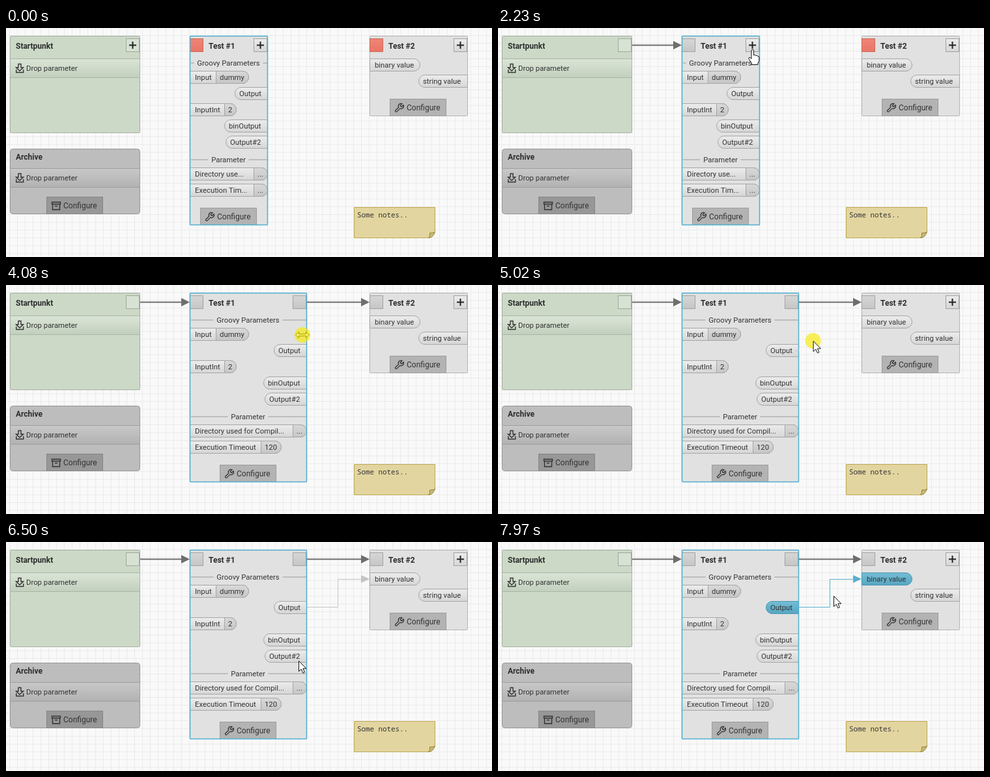
An HTML page that plays this animation: 746 by 353 pixels, repeating every 8000 ms.

```html
<!DOCTYPE html>
<html lang="en">
<head>
<meta charset="utf-8">
<title>Workflow editor</title>
<style>
  html, body { margin: 0; width: 100%; height: 100%; overflow: hidden; background: #f9f9f9; }
  svg { display: block; width: 746px; height: 353px; }
  text { font: 11.33px Roboto, sans-serif; fill: #333; white-space: pre; }
  .title { font-weight: 700; font-size: 12px; fill: #2d2d2d; }
  .big { font-size: 12px; }
  .mono { font: 10.83px "Noto Sans Mono", monospace; }
</style>
</head>
<body>
<svg id="stage" viewBox="0 0 746 353">
  <defs>
    <pattern id="grid" x="5" y="-1" width="12" height="12" patternUnits="userSpaceOnUse">
      <path d="M.5 0V12M0 .5H12" stroke="#ebebeb" fill="none"/>
    </pattern>
  </defs>
  <rect width="746" height="353" fill="url(#grid)"/>
  <g id="scene"></g>
</svg>
<script>
const LOOP = 8000, TICK = 77.5, LEAD = 20;
const LAG = 93;   // a dragged line trails the pointer
const INK = '#333', LINK = '#6e6e6e', PALE = '#c4c4c4', BLUE = '#5cb0cd';
const EDGE = '#a6a6a6';

// Moments at which a drag is released
const FLOW_1 = 1760, FLOW_2 = 3010, WIDENED = 4400, WIRED = 5740, DROPPED = 7590;

// What the pointer does: start, duration, goal, drag?, shape on arrival
const move = (at, dur, x, y, drag = false, shape = 'arrow') => ({ at, dur, x, y, drag, shape });
const ENTRY = { x: 390, y: 181 };
const MOVES = [
  move(220, 150, 328, 79),
  move(450, 390, 196, 28, false, 'hand'),
  move(910, 620, 291, 27, true, 'hand'),
  move(FLOW_1, 480, 391, 33, false, 'hand'),
  move(2310, 400, 572, 26, true, 'hand'),
  move(FLOW_2, 540, 397, 76, false, 'resize'),
  move(3780, 230, 455, 77, true, 'resize'),
  move(WIDENED, 150, 464, 115),
  move(4720, 200, 455, 102),
  move(4940, 440, 584, 51, true),
  move(WIRED, 70, 521, 114, false, 'resize'),
  move(5890, 600, 449, 183),
  move(6580, 470, 584, 52, true),
  move(DROPPED, 380, 515, 83)
];

function pointer(t) {
  const i = MOVES.findLastIndex(m => m.at <= t);
  if (i < 0) return { ...ENTRY, hidden: true };
  const m = MOVES[i], from = MOVES[i - 1] || ENTRY;
  const k = Math.min(1, (t - m.at) / m.dur);
  return {
    x: from.x + (m.x - from.x) * k,
    y: from.y + (m.y - from.y) * (1 - (1 - k) ** 1.5),
    drag: m.drag,
    shape: m.drag || k === 1 ? m.shape : 'arrow'
  };
}

// Drawing helpers
const defs = document.querySelector('defs');
function gradient(id, top, bottom) {
  defs.insertAdjacentHTML('beforeend', `<linearGradient id="${id}" x2="0" y2="1">` +
    `<stop stop-color="${top}"/><stop offset="1" stop-color="${bottom}"/></linearGradient>`);
  return `url(#${id})`;
}
const CHIP = gradient('chip', '#ececec', '#d6d6d6');
const VALUE = gradient('value', '#d9d9d9', '#c6c6c6');
const ACTIVE = gradient('active', '#74bdd5', '#56a6c2');
const GREEN_ROW = gradient('greenRow', '#dbe5d7', '#c2cfbd');
const GREY_ROW = gradient('greyRow', '#c8c8c8', '#b2b2b2');
const SQUARE = gradient('square', '#d6d6d6', '#c6c6c6');
const RED = gradient('red', '#ee8577', '#ea7666');

const text = (x, y, s, cls = '') => `<text x="${x}" y="${y}" class="${cls}">${s}</text>`;
const path = (d, stroke, fill = 'none', width = 1) =>
  `<path d="${d}" stroke="${stroke}" fill="${fill}" stroke-width="${width}"/>`;
const box = (x, y, w, h, fill, stroke, r = 0, width = 1) =>
  `<rect x="${x + .5}" y="${y + .5}" width="${w - 1}" height="${h - 1}" rx="${r}" ` +
  `fill="${fill}" stroke="${stroke}" stroke-width="${width}"/>`;

const port = (x, plus, fill = CHIP, stroke = '#a2a2a2') =>
  box(x, 16, 21, 21, fill, stroke) +
  (plus ? path(`M${x + 5} 26.5h11M${x + 10.5} 21v11`, '#222', 'none', 2) : '');
const inPort = (x, linked) =>
  linked ? port(x, false, SQUARE) : port(x, false, RED, '#c96a5d');

const pill = (x, y, end, fill, edge = EDGE) =>
  path(`M${x + .5} ${y + .5}H${end - 10}a9.5 9.5 0 0 1 0 19H${x + .5}z`, edge, fill);

const inChip = (x, y, label, end, blue) =>
  pill(x, y, end, blue ? ACTIVE : CHIP, blue ? '#4a96b1' : EDGE) + text(x + 8, y + 14, label);

const valueChip = (x, y, label, end, split, value) =>
  inChip(x, y, label, end) + pill(split, y, end, VALUE) + text(split + 6, y + 14, value);

function outChip(y, label, end, width, blue) {
  const x = end - width;
  return path(`M${end - .5} ${y + .5}H${x + 10}a9.5 9.5 0 0 0 0 19H${end - .5}z`,
    blue ? '#4a96b1' : EDGE, blue ? ACTIVE : CHIP) + text(x + 7, y + 14, label);
}

const WRENCH = 'M14.7 6.3a1 1 0 0 0 0 1.4l1.6 1.6a1 1 0 0 0 1.4 0l3.77-3.77a6 6 0 0 1-7.94 7.94' +
  'l-6.91 6.91a2.12 2.12 0 0 1-3-3l6.91-6.91a6 6 0 0 1 7.94-7.94l-3.76 3.76z';

const configure = (x, y) =>
  box(x, y, 87, 27, '#b3b3b3', '#9c9c9c') +
  `<g transform="translate(${x + 6.5} ${y + 6}) scale(.68)">${path(WRENCH, INK, 'none', 1.9)}</g>` +
  text(x + 26, y + 18, 'Configure', 'big');

const dropRow = (y, fill, edge) =>
  box(6, y, 200, 30, fill, edge) + text(31, y + 19, 'Drop parameter') +
  path(`M19 ${y + 8.5}h4v5.500h3.500l-5.500 5-5.500-5h3.500zM15.700 ${y + 17}v4.500h11v-4.500`, INK, 'none', 1.4);

function section(y, label, half, w) {
  const mid = 281.5 + w / 2;
  return `<text x="${mid}" y="${y + 4}" text-anchor="middle">${label}</text>` +
    path(`M284 ${y}H${mid - half}M${mid + half} ${y}H${281 + w}`, '#999');
}

const arrowHead = (x, y, color, h) =>
  `<path d="M${x} ${y}l-13 ${-h}v${2 * h}z" fill="${color}"/>`;

function flow(from, to) {
  const y = 26.5;
  return to < from + 13 ? '' :
    path(`M${from} ${y}H${to - 11}`, LINK, 'none', 2) + arrowHead(to, y, LINK, 6.5);
}

function wire(y, end, color) {
  const mid = Math.floor((462 + end.x) / 2) - .5;
  return path(`M462 ${y + .5}H${mid}V${end.y + .5}H${end.x - (end.head ? 10 : 0)}`, color) +
    (end.head ? arrowHead(end.x, end.y, color, 6) : '');
}

// Nodes
const startNode = linked =>
  box(6, 12, 200, 150, '#ccd9c7', '#a5afa1', 1) + text(15, 32, 'Startpunkt', 'title') +
  dropRow(47, GREEN_ROW, '#aab5a5') + port(184, !linked, '#d8e2d4', '#9fa99b');

const archiveNode = () =>
  box(6, 186, 200, 101, '#bdbdbd', '#969696', 4) + text(15, 203, 'Archive', 'title') +
  dropRow(216, GREY_ROW, '#9d9d9d') + box(62, 260, 87, 27, '#979797', '#858585') +
  path('M70.5 268.5h13v3h-13zM71.5 271.5h11v8.500h-11zM75 274.5h4', INK, 'none', 1.4) +
  text(88, 278, 'Configure', 'big');

function firstNode(w, linkedIn, linkedOut, blue) {
  const x = 282, r = x + w;
  const shown = s => s.slice(0, Math.round(13 + (w - 120) / 5)) + '...';
  const setting = (y, label) => valueChip(x, y, shown(label), r, r - 22, '...');
  return box(x, 12, w, 292, '#e1e1e1', 'none') +
    inPort(x, linkedIn) + text(311, 32, 'Test #1', 'title') +
    port(r - 22, !linkedOut, linkedOut ? SQUARE : CHIP) +
    section(54, 'Groovy Parameters', 53, w) +
    valueChip(x, 66, 'Input', 373, 322, 'dummy') +
    outChip(91, 'Output', r, 51, blue) +
    valueChip(x, 116, 'InputInt', 354, 335, '2') +
    outChip(141, 'binOutput', r, 67) +
    outChip(166, 'Output#2', r, 65) +
    section(203, 'Parameter', 31, w) +
    setting(215, 'Directory used for Compil') +
    (w < 141 ? setting(240, 'Execution Timeout')
             : valueChip(x, 240, 'Execution Timeout', 423, 391, '120')) +
    configure(x + w / 2 - 44, 277) +
    box(x, 12, w, 292, 'none', '#50aed0', 1, 1.5);
}

const secondNode = (linked, blue) =>
  box(558, 12, 151, 124, '#e1e1e1', '#b4b4b4', 1) +
  inPort(558, linked) + text(587, 32, 'Test #2', 'title') + port(687, true) +
  inChip(558, 47, 'binary value', 636, blue) +
  outChip(72, 'string value', 709, 76) + configure(589, 109);

const note = () =>
  path('M534.5 276.5h124v38l-9 9h-115z', '#bfa955', '#e2d5a0') +
  path('M658.5 314.5q-3 2-8 1.500q1 5-2 7.500q7 0 10-9z', '#94803a', '#cbb96f') +
  text(539, 292, 'Some notes..', 'mono');

const SHAPES = {
  arrow: 'M.5.5V16.500l3.700-3.500 2.600 5.800 2.600-1.100-2.600-5.700H11.800z',
  hand: 'M-2 2q0-1.600 1.700-1.600T1.500 2V9q2-1 3 .5q2-.7 3 .8q2.300-.3 2.300 2.200v5l-2 4v2H-1.500v-2' +
    'l-4-6q-1.500-3 .5-3.200q1.500 0 3 2.200z',
  resize: 'M-10.500 0l5-5v3.500H5.500V-5l5 5-5 5V1.500H-5.500V5z'
};

function cursor({ x, y, drag, shape, hidden }) {
  if (hidden) return '';
  const glow = drag ? `<circle cx="${x}" cy="${y}" r="12" fill="#f8ea00" opacity=".65"/>` : '';
  const icon = `<g transform="translate(${x} ${y})">${path(SHAPES[shape], '#111', '#fff')}</g>`;
  return shape === 'resize' ? icon + glow : glow + icon;
}

function scene(t) {
  const p = pointer(t), trail = pointer(t - LAG);
  const first = t >= FLOW_1, second = t >= FLOW_2, wired = t >= WIRED;

  const grip = pointer(Math.min(t, WIDENED - 1)).x;
  const w = t < 3780 ? 120 : Math.round(120 + 60 * (grip - 397) / 58);

  // Wires snap to the input once the pointer rests on it
  const wiring = p.drag && t > WIDENED;
  const rests = wiring && trail.drag && trail.x === p.x;
  const input = { x: 558, y: 57, head: true };
  const end = rests ? input : trail;
  const hover = wired && !p.drag && Math.abs(p.x - 509) < 14 && p.y < 120;

  let s = startNode(first) + archiveNode() + firstNode(w, first, second, hover);
  if (wired) s += wire(100, input, hover ? BLUE : PALE);
  if (wiring) s += wire(wired ? 175 : 100, end, PALE);
  s += secondNode(second, hover || rests) + note();

  if (first) s += flow(206, 282);
  else if (p.drag) s += flow(206, trail.x);
  if (second) s += flow(282 + w, 558);
  else if (first && p.drag) s += flow(402, trail.x);

  return s + cursor(p);
}

const layer = document.getElementById('scene');
const begin = performance.now();
let last = -1;
function draw() {
  const t = (performance.now() - begin) % LOOP;
  const tick = Math.floor((t + LEAD) / TICK);
  if (tick !== last) layer.innerHTML = scene(tick * TICK);
  last = tick;
  requestAnimationFrame(draw);
}
draw();
</script>
</body>
</html>
```
